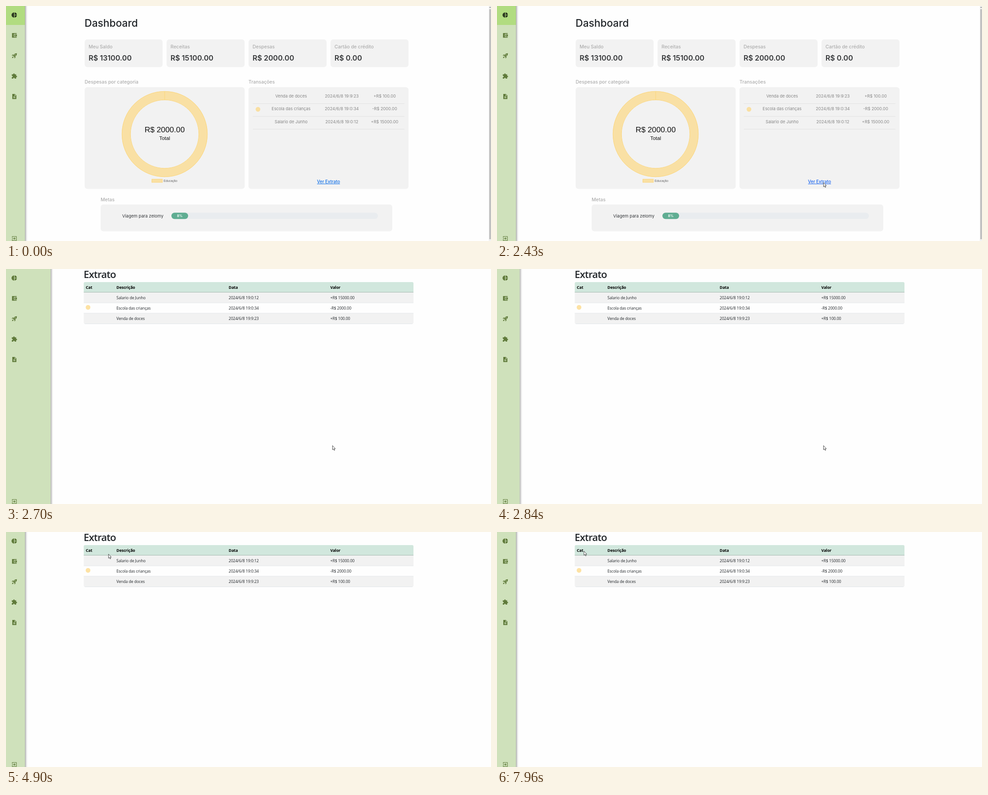
Animation, 1076 px wide and 521 px high, one loop 8000 ms. Source, as an HTML page:

```html
<!DOCTYPE html>
<html lang="pt-BR">
<head>
<meta charset="utf-8">
<title>Dashboard</title>
<style>
  html, body { margin: 0; height: 100%; overflow: hidden; background: #fefefe; }
  svg { display: block; width: 100vw; height: 100vh; }
  .dash text { font: 500 10.5px Inter, sans-serif; fill: #adadad; }
  .dash .h1 { font-size: 22.7px; fill: #212529; }
  .dash .sum { font-size: 16.1px; font-weight: 600; fill: #343638; }
  .dash .row text { font-size: 9.2px; font-weight: 400; fill: #868686; text-anchor: middle; }
  .dash .goal { font-size: 9.5px; font-weight: 400; fill: #34373a; }
  .dash .pct { font-size: 7.2px; font-weight: 700; fill: #fff; text-anchor: middle; }
  .dash .link { font-size: 9.65px; fill: #0d6ee8; text-anchor: middle; text-decoration: underline; }
  .dash .link.hover { fill: #0a58ca; }
  .dash .link.active { fill: #1763f0; }
  .dash .chart text { font: 17.2px "Liberation Sans", Arial, sans-serif; fill: #111; text-anchor: middle; }
  .dash .chart .total { font-size: 11.3px; }
  .dash .chart .key { font-size: 6.8px; fill: #666; text-anchor: start; }
  .panel { fill: #f2f2f2; }
  .rule { stroke: #e2e2e2; }
  .list text { font: 8.8px "Open Sans", sans-serif; letter-spacing: -.13px; fill: #212529; }
  .list .th { font-weight: 700; fill: #000; }
  .list .h1 { font-size: 22px; font-weight: 600; letter-spacing: -.8px; }
  .icons { fill: #5f7a3a; fill-rule: evenodd; }
  .on .icons :first-child { fill: #2c3a20; }
  .tab { fill: #b1dc80; visibility: hidden; }
  .on .tab { visibility: visible; }
  .cursor { fill: #fff; stroke: #222; stroke-width: .8; stroke-linejoin: round; }
</style>
</head>
<body>
<svg viewBox="0 0 1076 521" preserveAspectRatio="none">
  <defs>
    <linearGradient id="shade">
      <stop offset="0" stop-opacity=".34"/>
      <stop offset=".5" stop-opacity=".1"/>
      <stop offset="1" stop-opacity="0"/>
    </linearGradient>
  </defs>
  <rect width="1076" height="521" fill="#fefefe"/>

  <g class="dash" id="dash">
    <text class="h1" x="174.3" y="46">Dashboard</text>
    <g id="cards"></g>
    <text x="174.5" y="172">Despesas por categoria</text>
    <text x="538" y="172">Transações</text>
    <text x="210" y="433">Metas</text>
    <rect class="panel" x="174.5" y="180" width="355" height="225.5" rx="6"/>
    <rect class="panel" x="538" y="180" width="355" height="225.5" rx="6"/>
    <rect class="panel" x="210" y="440" width="647" height="59.5" rx="6"/>
    <g class="chart">
      <g fill="none" stroke="#fcd67b">
        <circle cx="352" cy="284" r="85.5" stroke="#f9e0a4" stroke-width="19"/>
        <circle cx="352" cy="284" r="94.7"/>
        <circle cx="352" cy="284" r="75.8"/>
        <path d="M352 189v19"/>
        <rect x="323.5" y="384" width="23.5" height="7" fill="#f9e0a4"/>
      </g>
      <text x="352" y="280">R$ 2000.00</text>
      <text class="total" x="352" y="296.5">Total</text>
      <text class="key" x="349.7" y="389.5">Educação</text>
    </g>
    <g id="moves"></g>
    <circle cx="559" cy="229" r="5.2" fill="#f9dfa2"/>
    <text class="link" id="link" x="715.5" y="393">Ver Extrato</text>
    <text class="goal" x="257.7" y="468.5">Viagem para zelomy</text>
    <rect x="367" y="458.3" width="458" height="14" rx="7" fill="#e9ecef"/>
    <rect x="367" y="458.3" width="37" height="14" rx="7" fill="#5fad92"/>
    <text class="pct" x="385.5" y="468">8%</text>
    <rect x="1071" width="5" height="521" fill="#f1f1f1"/>
    <rect x="1072" y="7" width="4" height="510" fill="#c1c1c1"/>
    <path d="M1072 4l2-2.5 2 2.5z" fill="#888"/>
  </g>

  <g class="list" id="list">
    <text class="h1" x="172.3" y="20">Extrato</text>
    <path d="M172.5 52V32q0-3 3-3H901q3 0 3 3V52z" fill="#d1e7dd"/>
    <path d="M172.5 52H904V75H172.5zM172.5 98H904V118.5q0 3-3 3H175.5q-3 0-3-3z" fill="#f2f2f2"/>
    <path d="M172.5 51.5H904" stroke="#a7b9b1"/>
    <path d="M172.5 75H904M172.5 98H904M174.500 121.5H902" stroke="#dee2e6" stroke-width=".8"/>
    <circle cx="182" cy="85" r="5.2" fill="#fde2a4"/>
    <g id="rows"></g>
  </g>

  <g id="side">
    <rect id="shadow" y="0" width="6" height="521" fill="url(#shade)"/>
    <rect id="bar" height="521" fill="#cfe1bb"/>
    <rect class="tab" width="42" height="42"/>
    <g class="icons" id="icons">
      <path d="M11 2a10 10 0 0 0 0 20zM13 2v9h9a10 10 0 0 0-9-9zM13 13v9a10 10 0 0 0 9-9z"/>
      <path d="M3 3H21V6H10V18H21V21H3zM12 8H22V16H12zM14.5 12a1.500 1.500 0 0 0 3 0 1.500 1.500 0 0 0-3 0z"/>
      <path d="M22 2Q14 2 10 7.500L7 12l5 5 4.500-3Q22 10 22 2zM13 9a2 2 0 0 0 4 0 2 2 0 0 0-4 0zM8.500 7.500h-4L2 12h4zM16.500 15.500v4L12 22v-4zM6 15q-3 1-3 6 5 0 6-3z"/>
      <path d="M2 5H8a2.700 2.700 0 1 1 5 0h6v6a2.700 2.700 0 1 1 0 5v6H13a2.700 2.700 0 1 0-5 0H2V16a2.700 2.700 0 1 0 0-5z"/>
      <path d="M4 2H14l6 6V22H4zM8 12h8v2H8zM8 16h8v2H8zM13 3.500V9h5.500z"/>
      <path d="M3 3H21V21H3V15H5v4H19V5H5V9H3zM3 11h9.700l-2.600-2.600L11.500 7l5 5-5 5-1.400-1.400L12.700 13H3z"/>
    </g>
  </g>

  <g class="cursor" id="cursor">
    <path id="arrow" d="M.4.5V9.800L2.500 7.900 4 11.200 5.400 10.600 4 7.400H6.700z"/>
    <path id="hand" d="M-1 1q1-1.200 2 0V5l4 .8q1.200.4 1 2L5.200 12H-.5L-3.500 7.800q0-1.300 1.200-.8L-1 8.200z"/>
    <path id="beam" d="M-2-4.600Q0-4.600 0-3.800V3.800Q0 4.600-2 4.600M2-4.600Q0-4.600 0-3.800M0 3.800Q0 4.600 2 4.600M-1.200.8H1.200" fill="none"/>
  </g>
</svg>
<script>
  const $ = id => document.getElementById(id);
  const text = (x, y, s, cls = '') => `<text class="${cls}" x="${x}" y="${y}">${s}</text>`;
  const show = (el, on) => { el.style.visibility = on ? 'visible' : 'hidden'; };
  const STEP = 70;

  const cards = [['Meu Saldo', '13100'], ['Receitas', '15100'], ['Despesas', '2000'], ['Cartão de crédito', '0']];
  $('cards').innerHTML = cards.map(([name, sum], i) => {
    const x = 174.5 + i * 181.85;
    return `<rect class="panel" x="${x}" y="74" width="173" height="61.5" rx="6"/>` +
      text(x + 8.7, 94, name) + text(x + 8.7, 120.5, `R$ ${sum}.00`, 'sum');
  }).join('');

  const entries = [
    ['Salario de Junho', '2024/6/8 19:0:12', '+R$ 15000.00'],
    ['Escola das crianças', '2024/6/8 19:0:34', '-R$ 2000.00'],
    ['Venda de doces', '2024/6/8 19:9:23', '+R$ 100.00']
  ];
  $('moves').innerHTML = [...entries].reverse().map((row, i) => {
    const y = 203 + i * 28.3;
    return `<g class="row">${row.map((s, c) => text([632.5, 745, 840][c], y, s)).join('')}</g>` +
      `<path class="rule" d="M547.5 ${y + 13.5}H884"/>`;
  }).join('');

  const cols = [245, 494, 719.5];
  $('rows').innerHTML = text(177, 43.7, 'Cat', 'th') +
    [['Descrição', 'Data', 'Valor'], ...entries].map((row, i) =>
      row.map((s, c) => text(cols[c], 43.7 + i * 23.15, s, i ? '' : 'th')).join('')).join('');

  [...$('icons').children].forEach((icon, i) => {
    const y = i < 5 ? 20 + i * 45.15 : 515.5;
    icon.setAttribute('transform', `translate(11.7 ${y - 6.8}) scale(.567)`);
  });

  // Pointer moves: start, end and key points; each one goes on from where the last stopped.
  const moves = [
    [460, 1230, [835, 390], [747, 382]],
    [1300, 1500, [724, 391]],
    [3260, 4020, [840, 156], [575, 25]],
    [4090, 4160, [508, 8]],
    [4420, 4420, [187, 16]],
    [4490, 5160, [212, 42], [270, 62]],
    [5230, 5300, [289, 62]],
    [5500, 6200, [272, 87], [262, 88]],
    [6400, 7140, [296, 104], [286, 112]],
    [7210, 7350, [325, 112]],
    [7550, 7960, [172, 52], [192.5, 41.8]]
  ];
  let last = [1080, 500];
  const paths = moves.map(([from, to, ...pts]) => {
    const path = { from, steps: Math.round((to - from) / STEP) + 1, pts: [last, ...pts] };
    last = pts[pts.length - 1];
    return path;
  });

  // Smooth curve through the key points.
  function along(pts, f) {
    const n = pts.length - 1, i = Math.min(n - 1, Math.floor(f * n)), u = f * n - i;
    const at = k => pts[Math.max(0, Math.min(n, k))];
    return [0, 1].map(d => {
      const [a, b, c, e] = [-1, 0, 1, 2].map(k => at(i + k)[d]);
      return b + u / 2 * (c - a + u * (2 * a - 5 * b + 4 * c - e + u * (3 * (b - c) + e - a)));
    });
  }

  function pointer(t) {
    if (t < 460 || (t >= 4160 && t < 4420)) return null;
    const { from, steps, pts } = paths.filter(p => p.from <= t).pop();
    const k = Math.floor((t - from + 12) / STEP) + 1;
    return along(pts, Math.min(1, k / steps));
  }

  const inside = (el, [x, y], pad = 0) => {
    const b = el.getBBox();
    return x >= b.x - pad && x <= b.x + b.width + pad && y >= b.y - pad && y <= b.y + b.height + pad;
  };
  const words = [...$('list').querySelectorAll('text')];

  // The menu loads wide and eases down to its narrow state.
  function sideWidth(t) {
    if (t < 2580) return 42;
    const q = 2630 + STEP * Math.floor((t - 2630) / STEP);
    const f = Math.max(0, Math.min(1, (q - 2620) / 290));
    return 42 + 100 * (1 - f) ** 1.75;
  }

  function draw(t) {
    const first = t < 2580;
    show($('dash'), first);
    show($('list'), !first);
    $('side').style.display = first || t >= 2640 ? '' : 'none';
    $('side').classList.toggle('on', first);
    const w = sideWidth(t);
    $('bar').setAttribute('width', w);
    $('shadow').setAttribute('x', w);

    const p = pointer(t);
    let kind = '';
    if (p) {
      kind = 'arrow';
      if (first && t < 2430 && inside($('link'), p, 6)) kind = 'hand';
      if (!first && words.some(el => inside(el, p))) kind = 'beam';
      $('cursor').setAttribute('transform', `translate(${p[0]} ${p[1]})`);
    }
    for (const id of ['arrow', 'hand', 'beam']) show($(id), id === kind);
    $('link').classList.toggle('hover', kind === 'hand');
    $('link').classList.toggle('active', t >= 2300 && first);
  }

  const start = performance.now();
  (function tick() {
    draw((performance.now() - start) % 8000);
    requestAnimationFrame(tick);
  })();
</script>
</body>
</html>
```
